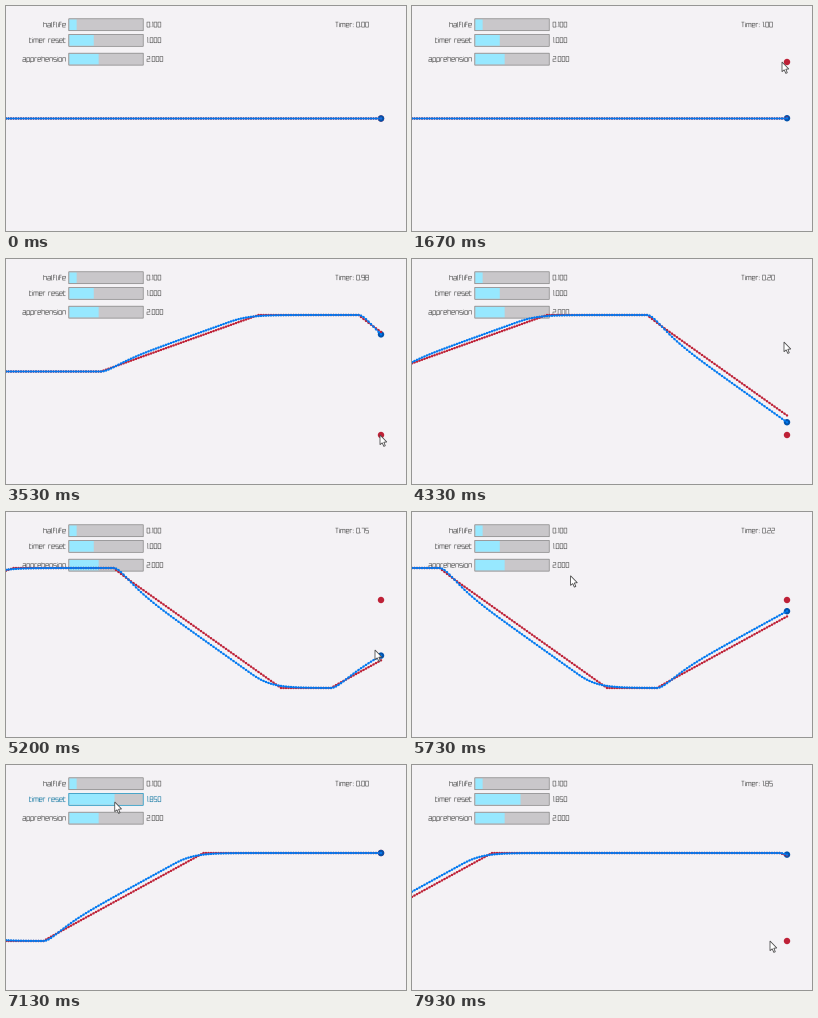
Animation of 400 by 225 pixels, one loop 8000 ms. Source, as a matplotlib script:

```python
import math
import numpy as np
import matplotlib.pyplot as plt
from matplotlib.animation import FuncAnimation
from matplotlib.collections import LineCollection
from matplotlib.patches import Circle, Polygon, Rectangle

FRAMES, FPS = 240, 15     # the picture is refreshed 15 times a second
STEPS_PER_SEC = 59.1      # simulation steps per second of playback
DT = 1 / 60
SPACING = 2.5             # pixels between neighbouring samples
HEAD_X = 375
HALFLIFE, APPREHENSION = 0.1, 2.0
PAST = 160                # samples kept on screen

BACK = "#f4f2f5"
RED, BLUE, DARK_BLUE = "#be2137", "#0079f1", "#0052ac"
# state: (border, text, slider fill)
STYLE = {
    "normal": ("#838383", "#686868", "#97e8ff"),
    "focused": ("#5bb2d9", "#6c9bbc", "#6c9bbc"),
    "pressed": ("#0492c7", "#368baf", "#97e8ff"),
}
DRAG = (6.35, 7.2)        # seconds during which the slider is held

# first held step, last held step, goal height
CLICKS = [(98, 101, 56), (201, 208, 176), (288, 292, 88), (467, 475, 176)]

# time, x, y of the mouse pointer
MOUSE = np.array([
    (1.0, 300, 190), (1.2, 345, 120), (1.4, 370, 56), (1.73, 370, 56),
    (2.1, 372, 98), (2.53, 374, 157), (2.6, 374, 161), (3.2, 374, 176),
    (3.55, 374, 176), (3.9, 373, 125), (4.33, 372, 83), (4.7, 371, 88),
    (4.97, 371, 88), (5.2, 369, 138), (5.35, 355, 150), (5.75, 150, 60),
    (6.05, 84, 37), (6.4, 84, 37), (7.0, 108.75, 37),
    (7.22, 108.75, 37), (7.4, 250, 120), (7.55, 358, 182),
    (7.72, 358, 181), (7.87, 358, 176),
])

# squared stroke lettering: W width, X lowercase height, C capital height
W, X, C = 2.8, 3.8, 5.0
M, H = X / 2, C / 2
GLYPHS = {
    "a": [[(0, X), (W, X), (W, 0), (0, 0), (0, M), (W, M)]],
    "e": [[(W, 0), (0, 0), (0, X), (W, X), (W, M), (0, M)]],
    "f": [[(0, 0), (0, C), (2, C)], [(0, 3), (1.8, 3)]],
    "h": [[(0, C), (0, 0)], [(0, X), (W, X), (W, 0)]],
    "i": [[(0, 0), (0, X)], [(0, C), (0, C - 0.3)]],
    "l": [[(0, C), (0, 0), (0.7, 0)]],
    "m": [[(0, 0), (0, X), (4.4, X), (4.4, 0)], [(2.2, X), (2.2, 0)]],
    "n": [[(0, 0), (0, X), (W, X), (W, 0)]],
    "o": [[(0, 0), (0, X), (W, X), (W, 0), (0, 0)]],
    "p": [[(0, -1.3), (0, X), (W, X), (W, 0), (0, 0)]],
    "r": [[(0, 0), (0, X), (2, X)]],
    "s": [[(W, X), (0, X), (0, M), (W, M), (W, 0), (0, 0)]],
    "t": [[(0, C), (0, 0), (1.9, 0)], [(0, X), (1.9, X)]],
    "T": [[(0, C), (W, C)], [(W / 2, C), (W / 2, 0)]],
    ":": [[(0, 0), (0, 0.7)], [(0, 2.7), (0, 3.4)]],
    ".": [[(0, 0), (0, 0.7)]],
    "0": [[(0, 0), (0, C), (W, C), (W, 0), (0, 0)]],
    "1": [[(0, C), (0.8, C), (0.8, 0)]],
    "2": [[(0, C), (W, C), (W, H), (0, H), (0, 0), (W, 0)]],
    "3": [[(0, C), (W, C), (W, 0), (0, 0)], [(0, H), (W, H)]],
    "4": [[(0, C), (0, H), (W, H)], [(W, C), (W, 0)]],
    "5": [[(W, C), (0, C), (0, H), (W, H), (W, 0), (0, 0)]],
    "6": [[(W, C), (0, C), (0, 0), (W, 0), (W, H), (0, H)]],
    "7": [[(0, C), (W, C), (W, 0)]],
    "8": [[(0, 0), (0, C), (W, C), (W, 0), (0, 0)], [(0, H), (W, H)]],
    "9": [[(W, H), (0, H), (0, C), (W, C), (W, 0), (0, 0)]],
}


def px(width):
    """Pixels to points."""
    return width * 0.72


def text_strokes(text, x, y, right=False):
    """Polylines of a text centred on height y."""
    lines, pen = [], 0
    for char in text:
        if char == " ":
            pen += 2.2
            continue
        glyph = GLYPHS[char]
        lines += [np.array(stroke) + (pen, 0) for stroke in glyph]
        pen += max(p[0] for stroke in glyph for p in stroke) + 1.15
    left = x - pen + 1.15 if right else x
    return [np.column_stack([left + s[:, 0], y + H - s[:, 1]]) for s in lines]


def mouse_at(t):
    return [np.interp(t, MOUSE[:, 0], MOUSE[:, k]) for k in (1, 2)]


def timer_reset(t):
    if t < DRAG[0]:
        return 1.0
    x = mouse_at(min(t, DRAG[1]))[0]
    return 3 * (x - 62.5) / 75


def simulate(count):
    """Timed spring damper; one row per step: goal, track, spring, timer."""
    damp = 2 * math.log(2) / HALFLIFE
    decay = math.exp(-damp * DT)
    goal = track = pos = 112.5
    vel = timer = 0.0
    rows = [(goal, track, pos, timer)] * PAST
    for step in range(count):
        timer = max(0.0, timer - DT)
        for first, last, height in CLICKS:
            if first <= step <= last:
                goal, timer = height, timer_reset(step / STEPS_PER_SEC)
        speed = (goal - track) / max(timer, DT)
        ahead = DT + APPREHENSION * HALFLIFE
        aim = track + speed * ahead if ahead < timer else goal
        j0 = pos - aim
        j1 = vel + j0 * damp
        pos = decay * (j0 + j1 * DT) + aim
        vel = decay * (vel - j1 * damp * DT)
        track += speed * DT
        rows.append((goal, track, pos, timer))
    return np.array(rows)


class Trace:
    """A thin line with a round dot on every sample."""

    def __init__(self, color, z):
        self.line, = ax.plot([], [], color=color, lw=px(0.7), zorder=z, snap=False)
        self.dots = LineCollection([], colors=color, linewidths=px(2.5),
                                   capstyle="round", zorder=z, snap=False)
        ax.add_collection(self.dots)

    def update(self, x, y):
        self.line.set_data(x, y)
        start = np.column_stack([x, y])
        self.dots.set_segments(np.stack([start, start + (0.02, 0)], axis=1))


class Slider:
    def __init__(self, label, y, top):
        self.label, self.y, self.top = label, y, top
        self.base = Rectangle((62.5, y), 75, 12.5, fc="#c9c7ca", ec="none", snap=False)
        self.fill = Rectangle((63.3, y + 0.9), 0, 10.7, ec="none", snap=False)
        self.edge = Rectangle((62.8, y + 0.3), 74.4, 11.9, fc="none",
                              lw=px(0.65), snap=False)
        for k, patch in enumerate((self.base, self.fill, self.edge)):
            patch.set_zorder(1 + k * 0.1)
            ax.add_patch(patch)
        self.text = make_text()

    def update(self, value, state):
        border, ink, fill = STYLE[state]
        self.fill.set_width(73.4 * value / self.top)
        self.fill.set_facecolor(fill)
        self.edge.set_edgecolor(border)
        mid = self.y + 6.1
        self.text.set_segments(text_strokes(self.label, 59.5, mid, right=True)
                               + text_strokes(f"{value:.3f}", 141, mid))
        self.text.set_color(ink)

    def hovered(self, x, y):
        return 62.5 <= x <= 137.5 and self.y <= y <= self.y + 12.5


def make_text():
    text = LineCollection([], colors=STYLE["normal"][1], linewidths=px(0.68),
                          zorder=1.5, snap=False)
    ax.add_collection(text)
    return text


fig = plt.figure(figsize=(4, 2.25), dpi=100, facecolor=BACK)
ax = fig.add_axes([0, 0, 1, 1])
ax.set_xlim(0, 400)
ax.set_ylim(225, 0)
ax.axis("off")

sliders = [Slider("halflife", 12.5, 1), Slider("timer reset", 28.1, 3),
           Slider("apprehension", 46.9, 5)]
clock = make_text()
goal_ball = Circle((HEAD_X, 0), 3.2, fc=RED, ec="none", zorder=2)
spring_ball = Circle((HEAD_X, 0), 3.2, fc=DARK_BLUE, ec="none", zorder=2.1)
ax.add_patch(goal_ball)
ax.add_patch(spring_ball)
track_trace, spring_trace = Trace(RED, 3), Trace(BLUE, 4)

ARROW = np.array([(0, 0), (0, 9.7), (2.2, 7.8), (3.8, 11.4), (5.3, 10.7),
                  (3.8, 7.2), (6.8, 7.0)])
pointer = Polygon(ARROW, fc="white", ec="#444444", lw=px(0.8), zorder=6, snap=False)
ax.add_patch(pointer)

history = simulate(480)


def draw(frame):
    tick = min((frame + 1) // 2, FRAMES // 2 - 1)
    t = tick / FPS
    now = PAST + round(t * STEPS_PER_SEC)
    part = history[now - PAST + 1:now + 1]
    x = HEAD_X - SPACING * np.arange(len(part))[::-1]
    track_trace.update(x, part[:, 1])
    spring_trace.update(x, part[:, 2])
    goal, _, pos, timer = part[-1]
    goal_ball.center = HEAD_X, goal
    spring_ball.center = HEAD_X, pos
    clock.set_segments(text_strokes(f"Timer: {timer:.2f}", 329.5, 18.6))

    mx, my = mouse_at(t)
    visible = t >= MOUSE[0, 0]
    pointer.set_visible(visible)
    pointer.set_xy(ARROW + (mx, my))

    dragging = DRAG[0] <= t < DRAG[1]
    for slider, value in zip(sliders, (HALFLIFE, timer_reset(t), APPREHENSION)):
        state = "normal"
        if visible and slider.hovered(mx, my):
            state = "pressed" if dragging else "focused"
        slider.update(value, state)
    return []


anim = FuncAnimation(fig, draw, frames=FRAMES, interval=8000 / FRAMES,
                     repeat=True, repeat_delay=0, blit=False)
plt.show()
```
